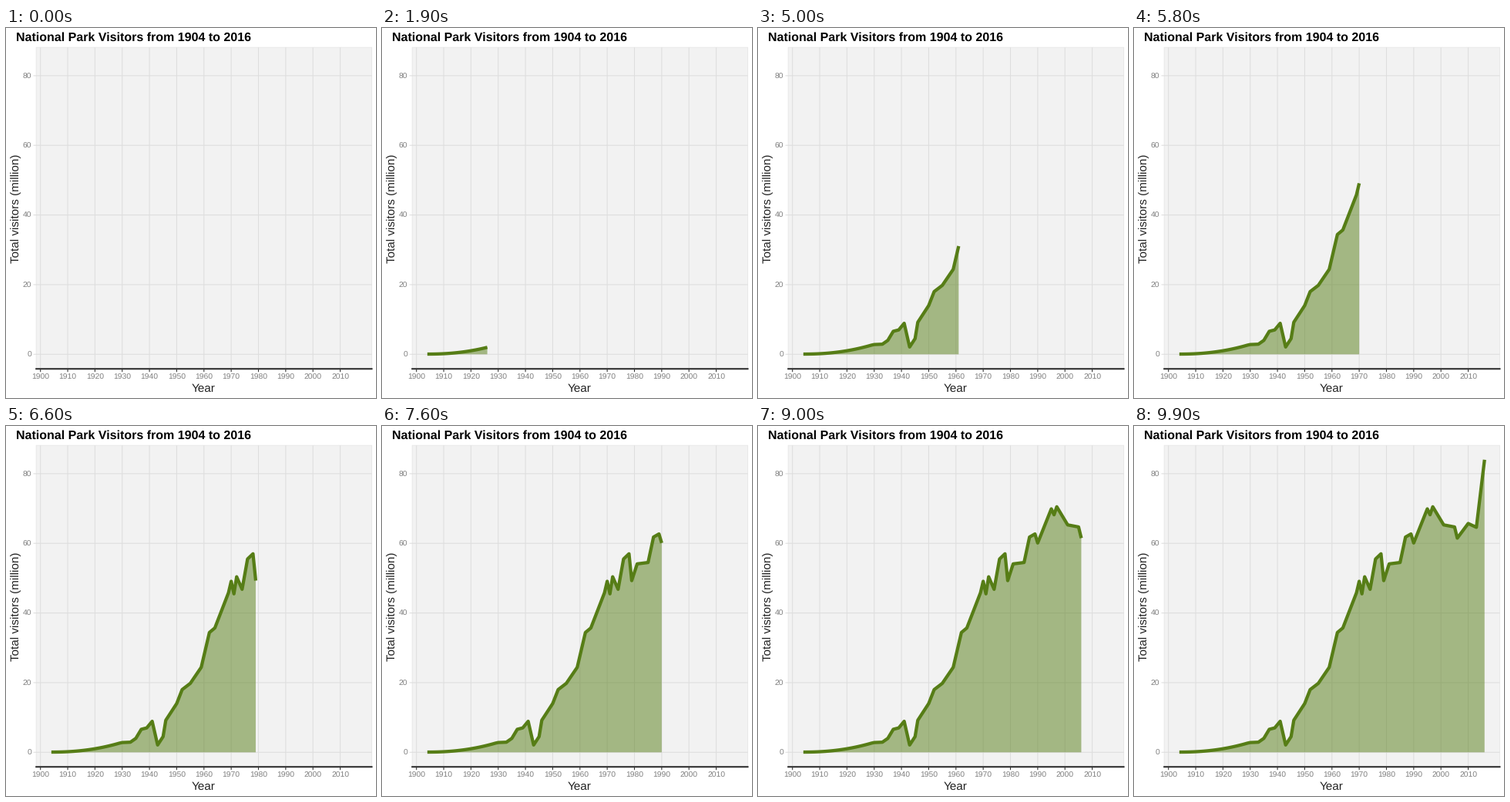
These frames come from a looping animation (480 by 480 pixels, 10000 ms). A matplotlib script:

```python
import matplotlib.pyplot as plt
import numpy as np
from matplotlib.animation import FuncAnimation

SIZE, DPI, FRAMES = 480, 100, 100
PX = 72 / DPI
FIRST, LAST = 1904, 2016
LEFT, RIGHT, TOP, BOTTOM = 39.2, 474.5, 25.2, 442.2
GREEN, GRID = "#567d16", "#dedede"
DARK, INK, MUTED = "#333333", "#222222", "#808080"

plt.rcParams.update({"font.family": "Liberation Sans",
                     "text.hinting": "none",
                     "text.kerning_factor": 0})

# Turning points after the slow early growth: year, million visitors
TURNS = [
    (1930, 2.8), (1933, 2.9), (1935, 4.0), (1937, 6.6), (1939, 7.0),
    (1941, 8.9), (1943, 2.1), (1945, 4.5), (1946, 9.2), (1950, 14.0),
    (1952, 18.0), (1955, 19.8), (1959, 24.4), (1962, 34.4), (1964, 35.7),
    (1969, 45.8), (1970, 49.1), (1971, 45.5), (1972, 50.4), (1974, 46.8),
    (1976, 55.5), (1978, 57.0), (1979, 49.3), (1981, 54.1), (1985, 54.5),
    (1987, 61.8), (1989, 62.7), (1990, 60.1), (1995, 69.9), (1996, 68.2),
    (1997, 70.5), (2001, 65.3), (2005, 64.7), (2006, 61.5), (2010, 65.7),
    (2013, 64.6), (2016, 84.0),
]


def visitors(years):
    turn_years, turn_values = zip(*TURNS)
    start = turn_years[0]
    early = turn_values[0] * ((years - FIRST) / (start - FIRST)) ** 2.2
    return np.where(years < start, early + .06,
                    np.interp(years, turn_years, turn_values))


def px_x(year):
    return 44.7 + (year - 1900) * 3.535


def px_y(value):
    return 423.3 - value * 4.518


fig = plt.figure(figsize=(SIZE / DPI, SIZE / DPI), dpi=DPI, facecolor="white")
ax = fig.add_axes([0, 0, 1, 1])
ax.set_xlim(0, SIZE)
ax.set_ylim(SIZE, 0)
ax.axis("off")


def line(x0, y0, x1, y1, color, width=1.07, z=1):
    ax.plot([x0, x1], [y0, y1], color=color, lw=width * PX,
            solid_capstyle="butt", snap=False, zorder=z)


def label(x, y, text, size, color, ha="center", va="baseline", **kw):
    ax.text(x, y, text, fontsize=size * PX, color=color, ha=ha, va=va, **kw)


ax.add_patch(plt.Rectangle((LEFT, TOP), RIGHT - LEFT, BOTTOM - TOP,
                           facecolor="#f2f2f2", edgecolor="#e8e8e8",
                           lw=PX, snap=False, zorder=0))

for value in range(0, 81, 20):
    y = px_y(value)
    line(35.5, y, RIGHT, y, GRID)
    label(33, y + 3.7, str(value), 10.4, MUTED, ha="right")

for year in range(1900, 2011, 10):
    x = px_x(year)
    line(x, TOP, x, BOTTOM, GRID)
    line(x, BOTTOM, x, 446.2, DARK)
    label(x, 456.3, str(year), 10.4, MUTED)

line(LEFT - 1, BOTTOM, RIGHT + 1, BOTTOM, DARK, 2.13, z=5)
label(12.8, 17, "National Park Visitors from 1904 to 2016", 16, "black",
      ha="left", weight="bold")
label(256.5, 472, "Year", 15.2, INK)
label(19.7, 234.2, "Total visitors (million)", 15.2, INK, ha="right",
      va="center", rotation=90)

area = ax.fill([0], [0], facecolor=GREEN, alpha=.5, lw=0, zorder=3)[0]
curve, = ax.plot([], [], color=GREEN, lw=4.27 * PX, zorder=4,
                 solid_capstyle="butt", solid_joinstyle="round")

all_years = np.arange(FIRST, LAST + 1)
all_x, all_y = px_x(all_years), px_y(visitors(all_years))


def draw(i):
    # Each year appears on the frame nearest to its share of the loop
    last = int((i + .5) * (LAST - FIRST) / (FRAMES - 1))
    x, y = all_x[:last + 1], all_y[:last + 1]
    for part in (area, curve):
        part.set_visible(last > 0)
    curve.set_data(x, y)
    base = px_y(0)
    area.set_xy(np.column_stack([np.r_[x[0], x, x[-1]],
                                 np.r_[base, y, base]]))
    return area, curve


anim = FuncAnimation(fig, draw, frames=FRAMES, interval=100,
                     repeat=True, repeat_delay=0)
plt.show()
```
